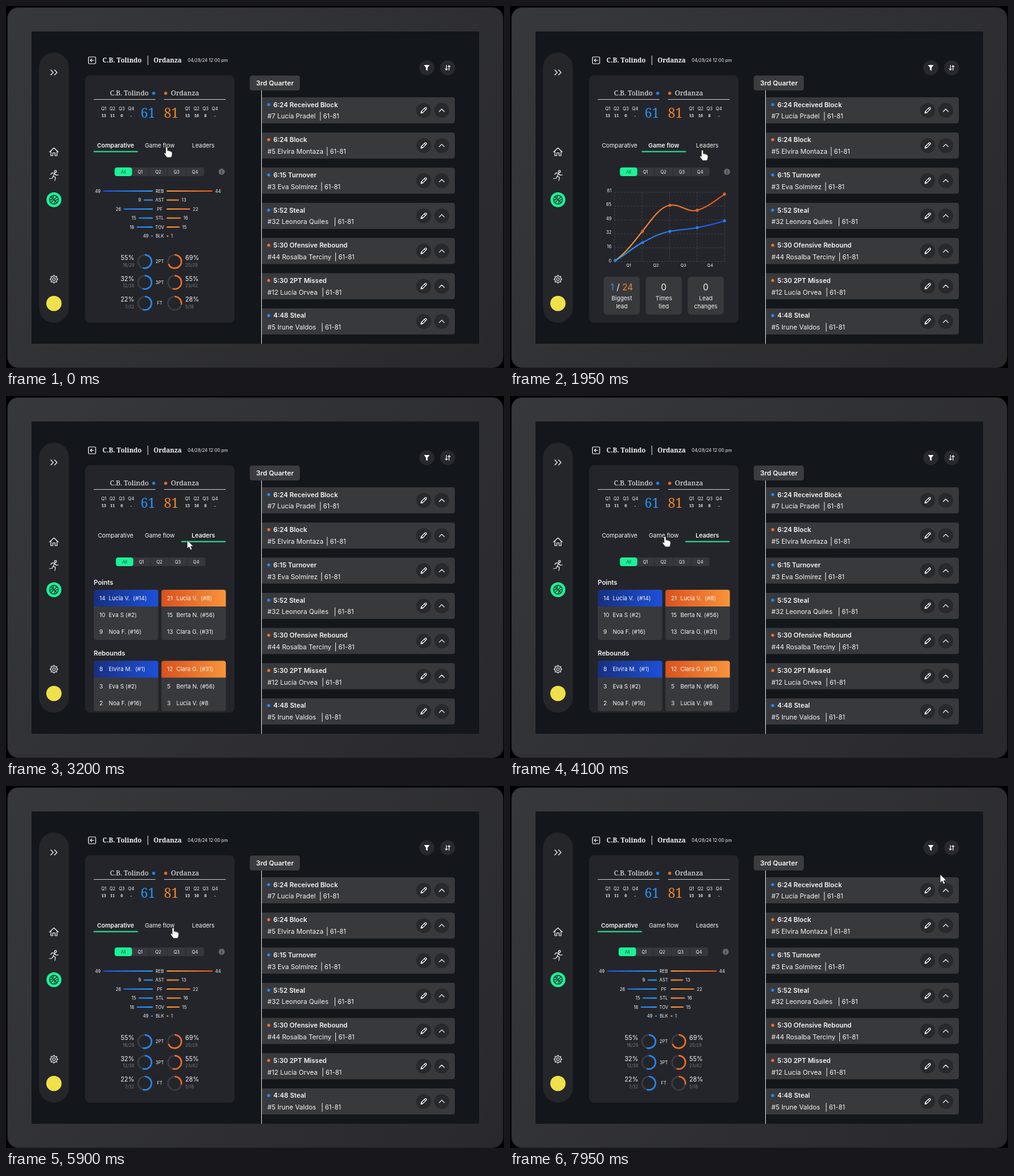
An HTML page that plays this animation: 800 by 583 pixels, repeating every 8 s.

```html
<!DOCTYPE html>
<html lang="en">
<head>
<meta charset="utf-8">
<title>Match dashboard</title>
<style>
html, body { margin: 0; width: 100%; height: 100%; overflow: hidden; background: #000; }
svg { display: block; width: 100%; height: 100%; }
text { font-family: Inter, "Noto Sans", sans-serif; fill: #f4f4f5; white-space: pre; }
.slab { font-family: "Noto Serif", serif; }
.line { fill: none; stroke: #f0f0f2; stroke-width: 1.2; stroke-linecap: round; stroke-linejoin: round; }
</style>
</head>
<body>
<svg id="stage" viewBox="0 0 800 583" xmlns="http://www.w3.org/2000/svg"></svg>
<script>
const BLUE = '#1f86f5', ORANGE = '#ee6c2a', GREEN = '#1cf297', CARD = '#38393d';
const ANCHOR = { l: 'start', m: 'middle', r: 'end' };

const text = (s, x, y, size, align = 'l', weight = 400, extra = '') =>
  `<text x="${x}" y="${y}" font-size="${size}" text-anchor="${ANCHOR[align]}" font-weight="${weight}" ${extra}>${s}</text>`;
const slab = (s, x, y, size, align, weight, fill = '#f4f4f5') =>
  text(s, x, y, size, align, weight, `class="slab" style="fill:${fill}"`);
const rect = (x, y, w, h, r, fill, extra = '') =>
  `<rect x="${x}" y="${y}" width="${w}" height="${h}" rx="${r}" fill="${fill}" ${extra}/>`;
const circle = (x, y, r, fill, extra = '') => `<circle cx="${x}" cy="${y}" r="${r}" fill="${fill}" ${extra}/>`;
const line = (d, extra = '') => `<path class="line" d="${d}" ${extra}/>`;
const at = (x, y, body) => `<g transform="translate(${x} ${y})">${body}</g>`;
const group = (id, body) => `<g id="${id}">${body}</g>`;
const gradient = (id, x1, x2, a, b, y1 = 0, y2 = 0) =>
  `<linearGradient id="${id}" gradientUnits="userSpaceOnUse" x1="${x1}" x2="${x2}" y1="${y1}" y2="${y2}">
   <stop stop-color="${a}"/><stop offset="1" stop-color="${b}"/></linearGradient>`;

const defs = `<defs>
  ${gradient('bezel', 0, 800, '#37383c', '#29292d', 0, 583)}
  ${gradient('barL', 156, 236, '#1f50e4', '#2a9dfa')}
  ${gradient('barR', 258, 332, '#f59a3c', '#e8541e')}
  ${gradient('flowB', 169, 345, '#2a9dfa', '#2150e6')}
  ${gradient('flowO', 169, 345, '#f59a3c', '#e5521e')}
  ${gradient('headB', 141, 244, '#172f80', '#1d50d8')}
  ${gradient('headO', 250, 353, '#d9521e', '#f8933a')}
</defs>`;

function sidebar() {
  const gear = Array.from({ length: 8 }, (_, i) =>
    `<path class="line" d="M0-5.4V-6.6" stroke-width="2.6" transform="rotate(${i * 45})"/>`).join('');
  return rect(53, 75, 48, 435, 24, '#24262a') +
    line('M72 103l4 4-4 4M78 103l4 4-4 4', 'stroke-width="1.5"') +
    at(77, 235, line('M-7 0L0-6.500L7 0M-5-1.500V6H-1.800V1.500H1.800V6H5V-1.500', 'stroke-width="1.1"')) +
    at(77, 273, circle(2.5, -6.5, 1.7, 'none', 'class="line" stroke-width="1"') +
      line('M-5-2L-2.500-4.500L1-3.500L-1 1L2.500 3L1.500 8M-1 1L-3 4.500L-7 5M1-3.500L3.500-.5L7-1M-2.500-4.500L-.5-4', 'stroke-width="1.1"')) +
    circle(77, 312, 12, GREEN) +
    at(77, 312, `<g fill="none" stroke="#16352b" stroke-width="1.3"><circle r="7"/>
      <path d="M-5-5L5 5M5-5L-5 5M-1-7Q0-1-7 1M1 7Q0 1 7-1"/></g>`) +
    at(77, 440, gear + circle(0, 0, 5.2, '#24262a', 'stroke="#f0f0f2" stroke-width="1.2"') + circle(0, 0, 2.2, 'none', 'stroke="#f0f0f2" stroke-width="1.1"')) +
    circle(77, 479, 12.3, '#f0e04a');
}

function header() {
  return rect(132.5, 82, 11.5, 11, 1.5, 'none', 'class="line"') +
    line('M141 87.500H135.500M137.800 85.200L135.500 87.500L137.800 89.800') +
    slab('C.B. Tolindo', 155, 91, 10.4, 'l', 700) +
    rect(227.4, 80, 1, 15, 0, '#e4e4e6') +
    slab('Ordanza', 237, 91, 10.4, 'l', 700) +
    text('04/28/24 12:00 pm', 292, 90, 7.1) +
    circle(676, 99.5, 12, '#27292e') +
    '<path d="M671.500 95H680.500L677.200 99.500V104.500L674.800 103V99.500Z" fill="#fff"/>' +
    circle(709.5, 99.5, 12, '#27292e') +
    line('M707.500 95.500V103M705.700 101.300L707.500 103.200L709.300 101.300M711.700 103.500V96M709.900 97.700L711.700 95.800L713.500 97.700');
}

function scores() {
  const quarters = (xs, vals) => xs.map((x, i) =>
    text('Q' + (i + 1), x, 168, 7, 'm') + slab(vals[i], x, 179, 6.8, 'm', 700)).join('');
  return slab('C.B. Tolindo', 229, 144, 11, 'r') + circle(237.3, 140.5, 2.5, BLUE) +
    circle(256.5, 140.5, 2.5, ORANGE) + slab('Ordanza', 265, 144, 11) +
    rect(141, 150, 99, 1, 0, '#c4c4c7') + rect(254, 150, 99, 1, 0, '#c4c4c7') +
    quarters([157, 171, 186, 201], ['13', '11', '6', '-']) +
    quarters([291.5, 306, 320.5, 335.5], ['13', '16', '8', '-']) +
    slab('61', 228, 180, 21, 'm', 400, '#2694f5') + slab('81', 265.5, 180, 21, 'm', 400, '#f0872e');
}

function tabs() {
  return [['Comparative', 176], ['Game flow', 247], ['Leaders', 317]].map(([name, x], i) =>
    group('off' + i, text(name, x, 228, 9.5, 'm')) +
    group('on' + i, text(name, x, 228, 9.6, 'm', 600) + rect(x - 35.5, 233.6, 71.5, 2, 1, '#2be094'))).join('');
}

function selector() {
  const cells = [215.5, 244.5, 274, 303.5];
  return group('selector', rect(174.5, 260, 144, 14, 4, '#36373c') + rect(174.5, 260, 28, 14, 4, GREEN) +
    text('All', 188.5, 269.6, 7, 'm', 400, 'style="fill:#14603f"') +
    cells.map((x, i) => text('Q' + (i + 1), x, 269.6, 7, 'm') +
      (i ? rect(x - 15, 260, .8, 14, 0, '#2a2b2f') : '')).join('') +
    group('info', circle(346.5, 267, 5, '#66676a') + text('i', 346.5, 269.6, 7, 'm', 700, 'style="fill:#24252a"')));
}

function comparative() {
  const rows = [['REB', 49, 80, 44, 74], ['AST', 9, 15, 13, 20], ['PF', 26, 47, 22, 38],
    ['STL', 15, 23, 16, 23], ['TOV', 18, 26, 15, 21], ['BLK', 49, 3, 1, 3]];
  const bars = rows.map(([name, a, wa, b, wb], i) => {
    const y = 298 + i * 14.5;
    return text(name, 247, y + 2.6, 7, 'm') +
      rect(236 - wa, y - 1.1, wa, 2.2, 1, 'url(#barL)') + text(a, 232 - wa, y + 2.6, 7.2, 'r') +
      rect(258, y - 1.1, wb, 2.2, 1, 'url(#barR)') + text(b, 262 + wb, y + 2.6, 7.2);
  }).join('');

  const ring = (x, y, part, color) => circle(x, y, 10.8, 'none', 'stroke="#3c3d41" stroke-width="2.4"') +
    circle(x, y, 10.8, 'none', `stroke="${color}" stroke-width="2.4" pathLength="100" stroke-dasharray="${part} 100" transform="rotate(-90 ${x} ${y})"`);
  const grey = 'style="fill:#77787b"';
  const shots = [['2PT', '55%', '16/29', 55, '69%', '20/29', 69], ['3PT', '32%', '12/38', 55, '55%', '23/42', 55],
    ['FT', '22%', '7/32', 55, '28%', '5/18', 28]];
  const rings = shots.map(([name, a, fa, pa, b, fb, pb], i) => {
    const y = 411.5 + i * 33.6;
    return text(name, 247, y + 2.6, 7, 'm') + ring(223, y, pa, '#2388f0') + ring(271, y, pb, '#ee6f28') +
      text(a, 206, y - 2.5, 10, 'r') + text(fa, 206, y + 8.3, 7, 'r', 400, grey) +
      text(b, 288, y - 2.5, 10) + text(fb, 288, y + 8.3, 7, 'l', 400, grey);
  }).join('');
  return bars + rings;
}

function flow() {
  const dash = 'style="stroke:#47484c;stroke-width:.8;stroke-dasharray:3 2;stroke-linecap:butt"';
  const grid = [81, 65, 49, 32, 16, 0].map((n, i) =>
    line(`M168 ${300 + i * 22.3}H345`, dash) + text(n, 163, 299.6 + i * 22.6, 7, 'r')).join('') +
    [0, 1, 2, 3, 4].map(i => line(`M${168 + i * 44.2} 300V411.500`, dash)).join('') +
    [190.5, 234.5, 278.5, 321.5].map((x, i) => text('Q' + (i + 1), x, 419.8, 6.6, 'm')).join('');
  const curve = (d, ys, paint, color) =>
    `<path d="${d}" fill="none" stroke="url(#${paint})" stroke-width="2"/>` +
    ys.map((y, i) => circle(169 + i * 43.9, y, 2.4, color)).join('');
  const card = (x, value, a, b) => rect(x - 29, 436, 58, 61, 5, CARD) + text(value, x, 458, 14, 'm') +
    text(a, x, 474.4, 9.3, 'm') + text(b, x, 486.8, 9.3, 'm');
  return grid +
    curve('M169 410C185 399 198 381 212.500 363S240 324 256.500 321S285 333 300.500 329S330 313 345 303',
      [410, 363, 321, 329, 303], 'flowO', '#ea6527') +
    curve('M169 410C184 402 197 389 212.500 381S240 366 256.500 363S286 360 300.500 357S330 351 345 346',
      [410, 381, 363, 357, 346], 'flowB', BLUE) +
    card(179.5, '<tspan fill="#2a95f5">1</tspan> / <tspan fill="#f0872e">24</tspan>', 'Biggest', 'lead') +
    card(247, 0, 'Times', 'tied') + card(314.5, 0, 'Lead', 'changes');
}

function leaders() {
  const table = (x, y, paint, rows) => rect(x, y, 103.5, 81, 4, CARD) +
    `<path d="M${x} ${y + 27}v-23q0-4 4-4h95.500q4 0 4 4v23z" fill="url(#${paint})"/>` +
    rows.map(([n, name], i) => text(n, x + 9, y + 16.8 + i * 27.2, 9.2) +
      text(name, x + 24, y + 16.8 + i * 27.2, 9.2)).join('');
  return text('Points', 141, 304, 10.4, 'l', 600) +
    table(141, 312, 'headB', [[14, 'Lucía V.  (#14)'], [10, 'Eva S (#2)'], [9, 'Noa F. (#16)']]) +
    table(249.7, 312, 'headO', [[21, 'Lucía V.  (#8)'], [15, 'Berta N. (#56)'], [13, 'Clara G. (#31)']]) +
    text('Rebounds', 141, 418.4, 10.4, 'l', 600) +
    table(141, 426.5, 'headB', [[8, 'Elvira M.  (#1)'], [3, 'Eva S (#2)'], [2, 'Noa F. (#16)']]) +
    table(249.7, 426.5, 'headO', [[12, 'Clara G. (#31)'], [5, 'Berta N. (#56)'], [3, 'Lucía V. (#8']]);
}

function events() {
  const list = [
    [BLUE, '6:24 Received Block', '#7 Lucía Pradel', 505],
    [ORANGE, '6:24 Block', '#5 Elvira Montaza', 516],
    [BLUE, '6:15 Turnover', '#3 Eva Solmírez', 507],
    [BLUE, '5:52 Steal', '#32 Leonora Quiles', 528.5],
    [ORANGE, '5:30 Ofensive Rebound', '#44 Rosalba Terciny', 529.5],
    [ORANGE, '5:30 2PT Missed', '#12 Lucía Orvea', 509],
    [BLUE, '4:48 Steal', '#5 Irune Valdos', 508]];
  const pencil = line('M-4.500 4.500L-3.800 1.600L2.200-4.400Q3.300-5 4.200-4.100Q5-3.200 4.400-2.200L-1.600 3.800ZM1-3.200L3.200-1M-3.800 1.600L-1.600 3.800', 'stroke-width="1"');
  return list.map(([color, title, player, bar], i) => at(0, 147 + i * 56.65,
    `<path d="M411 0H717q4 0 4 4V38q0 4-4 4H411Z" fill="${CARD}"/>` +
    circle(422, 11.7, 2.5, color) + text(title, 429.5, 15.6, 10.5, 'l', 600) +
    text(player, 420, 34.3, 10.6) + rect(bar - .5, 23.5, 1, 14, 0, '#e4e4e6') + text('61-81', bar + 4.5, 34.3, 10.2) +
    circle(671, 21, 12, '#27292d') + at(671, 21, pencil) +
    circle(700, 21, 12, '#27292d') + line('M696 23L700 19L704 23', 'stroke-width="1.6"'))).join('') +
    rect(410, 136, 1, 408, 0, '#dcdcde') + rect(391.5, 112, 80.5, 24, 4, '#3b3c40') +
    text('3rd Quarter', 432, 128, 10.8, 'm', 600);
}

const pointer = `<g id="pointer" fill="#fff" stroke="#1a1a1c" stroke-width=".8" stroke-linejoin="round">
  <path id="arrow" d="M0 0V14L3.200 11L5.500 16L8 15L5.800 10.200H10Z"/>
  <path id="hand" d="M-1.600 1.500A1.600 1.600 0 0 1 1.600 1.500V6Q3 5 4.300 6.600Q5.800 5.800 6.800 7.400Q9 7 9 9.500V12Q9 15 7 17H.5L-4 11Q-4.500 9-2.800 9.200L-1.600 10.500Z"/></g>`;

const $ = id => document.getElementById(id);
$('stage').innerHTML = defs + rect(2.5, 2.5, 796, 580, 17, 'url(#bezel)', 'stroke="#202124"') +
  rect(41, 41, 719, 503, 0, '#13161b') + sidebar() + header() +
  rect(127, 111.5, 240, 398.5, 8, '#24252a') + scores() + tabs() + selector() +
  group('page0', comparative()) + group('page2', leaders()) + group('page1', flow()) + events() + pointer;

const LOOP = 8000, FADE = 300;
const switches = [[50, 1], [2460, 2], [4120, 1], [5250, 0]];
const path = [[0, 258, 227], [850, 253, 225], [1550, 253, 225], [1950, 309, 232], [2600, 309, 232],
  [3200, 291, 232], [3800, 249, 226], [4850, 249, 226], [5200, 180, 229], [5760, 180, 229],
  [6100, 417, 227], [6700, 417, 227], [7500, 685, 141], [7950, 691, 142], [LOOP, 691, 142]];

function pages(t) {
  let from = 0, to = 0, start = -FADE;
  for (const [time, page] of switches) if (t >= time) [from, to, start] = [to, page, time];
  const u = Math.min(1, (t - start) / FADE), p = 1 - (1 - u) ** 2;
  const w = [0, 0, 0];
  w[from] += 1 - p;
  w[to] += p;
  return { w, active: to };
}

function cursor(t) {
  const i = path.findIndex(k => k[0] > t);
  const [t0, x0, y0] = path[i - 1], [t1, x1, y1] = path[i];
  const u = (t - t0) / (t1 - t0), e = u * u * (3 - 2 * u);
  return [x0 + (x1 - x0) * e, y0 + (y1 - y0) * e];
}

function draw(t) {
  const { w, active } = pages(t);
  w.forEach((v, i) => {
    $('page' + i).style.opacity = $('on' + i).style.opacity = v;
    $('off' + i).style.opacity = 1 - v;
  });
  $('selector').setAttribute('transform', `translate(${2 * (1 - w[0])} 0)`);
  $('info').style.opacity = 1 - w[2];

  const [x, y] = cursor(t);
  const tab = x > 353 || x < 140 ? active : Math.floor((x - 140) / 71);
  $('pointer').setAttribute('transform', `translate(${x} ${y})`);
  $('hand').style.display = tab !== active ? '' : 'none';
  $('arrow').style.display = tab !== active ? 'none' : '';
}

function tick() {
  draw(performance.now() % LOOP);
  requestAnimationFrame(tick);
}
tick();
</script>
</body>
</html>
```
